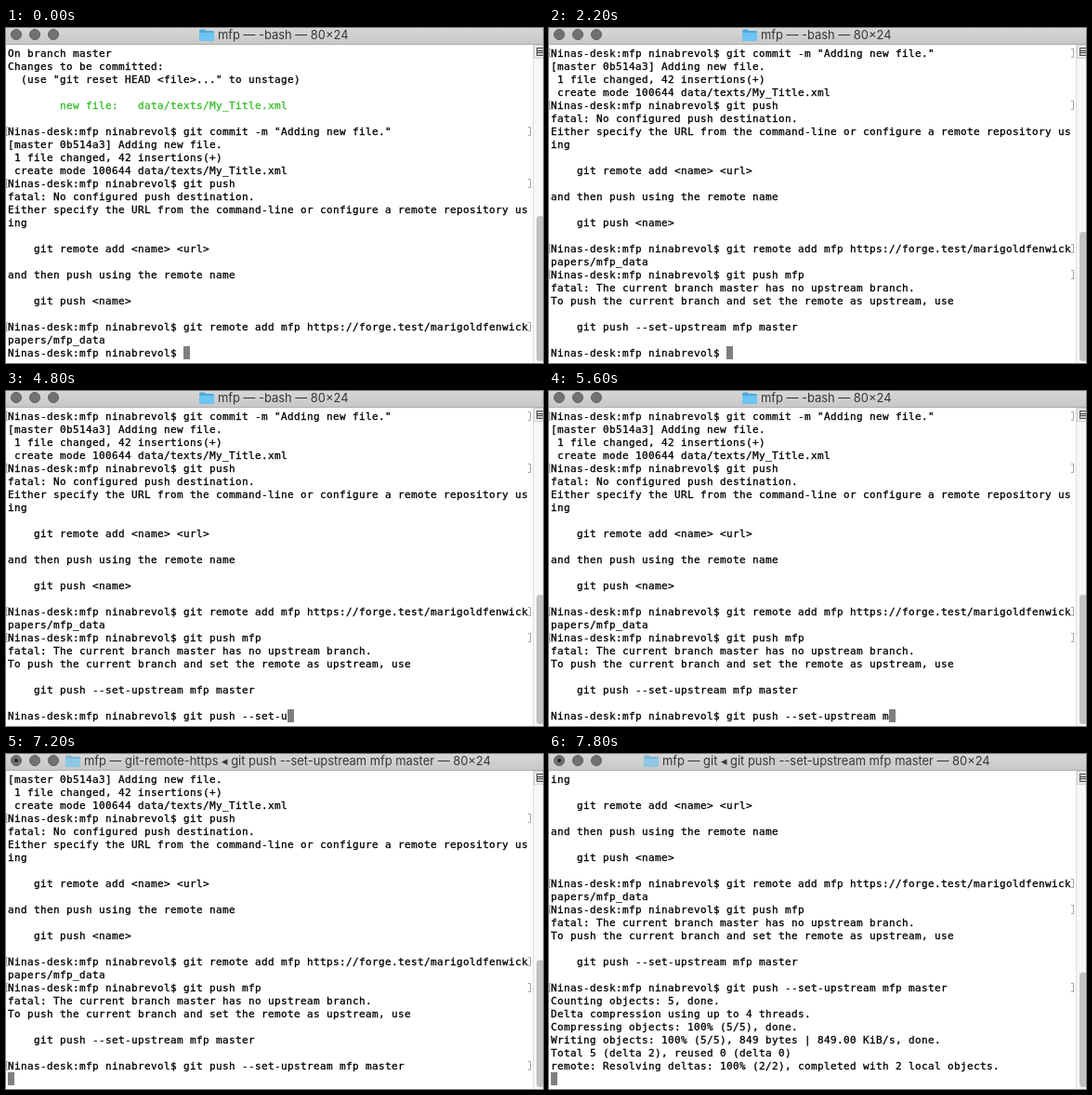
An HTML page that plays this animation: 578x360 px, repeating every 8 s.

```html
<!DOCTYPE html>
<html lang="en">
<head>
<meta charset="utf-8">
<title>Terminal</title>
<style>
  html, body { margin: 0; width: 100%; height: 100%; overflow: hidden; background: #fff; }
  svg { display: block; width: 578px; height: 360px; }
  text { white-space: pre; }
  #rows text {
    font: 11px "DejaVu Sans Mono", "Noto Sans Mono", monospace;
    letter-spacing: .377px;
    fill: #000;
    stroke: #000;
    stroke-width: .3px;
  }
  #rows text.added { fill: #34bc26; stroke: #34bc26; }
  #rows path { fill: none; stroke: #a3a3a3; }
  #title { font: 12.9px Inter, "DejaVu Sans", sans-serif; fill: #363636; }
</style>
</head>
<body>
<svg viewBox="0 0 578 360">
  <defs>
    <linearGradient id="bar" x2="0" y2="1">
      <stop offset="0" stop-color="#d6d6d6"/>
      <stop offset="1" stop-color="#c8c8c8"/>
    </linearGradient>
  </defs>
  <rect width="578" height="360" fill="#fff"/>

  <g id="rows"></g>
  <rect id="cursor" width="7" height="14" fill="#7f7f7f"/>

  <rect x="567" y="18" width="11" height="342" fill="#f7f7f7"/>
  <path d="M567.5 18V360" stroke="#dedede"/>
  <rect id="thumb" x="571" width="8" rx="3.5" fill="#c1c1c1"/>
  <rect x="568.5" y="18.5" width="12" height="14" fill="#ececec" stroke="#cfcfcf"/>
  <rect x="571.5" y="21.5" width="8" height="8" fill="#d0d0d0" stroke="#4a4a4a"/>
  <path d="M572 24.5H578M572 26.5H578" stroke="#4a4a4a"/>

  <rect width="578" height="17" fill="url(#bar)"/>
  <path d="M0 17.5H578" stroke="#adadad"/>
  <g fill="#717171" stroke="#5f5f5f">
    <circle cx="11" cy="7" r="5.5"/>
    <circle cx="31" cy="7" r="5.5"/>
    <circle cx="51" cy="7" r="5.5"/>
  </g>
  <circle id="busy" cx="11" cy="7" r="2" fill="#222"/>
  <g id="folder">
    <path d="M0 3Q0 1.5 1.5 1.5H5.5L7.5 3H14.5Q16 3 16 4.5V12.5Q16 14 14.5 14H1.5Q0 14 0 12.5Z" fill="#4fa9dc"/>
    <path d="M0 5H16V12.5Q16 14 14.5 14H1.5Q0 14 0 12.5Z" fill="#6cc5f3"/>
  </g>
  <text id="title" y="12"></text>
</svg>

<script>
const LOOP = 8000, ROWS = 24, LINE = 14, CHAR = 7, LEFT = 2, TOP = 20;
const PROMPT = "Ninas-desk:mfp ninabrevol$ ";
const PUSH = "git push mfp";
const UPSTREAM = "git push --set-upstream mfp master";

const buffer = [
  "On branch master",
  "Changes to be committed:",
  '  (use "git reset HEAD <file>..." to unstage)',
  "",
  "        new file:   data/texts/My_Title.xml",
  "",
  PROMPT + 'git commit -m "Adding new file."',
  "[master 0b514a3] Adding new file.",
  " 1 file changed, 42 insertions(+)",
  " create mode 100644 data/texts/My_Title.xml",
  PROMPT + "git push",
  "fatal: No configured push destination.",
  "Either specify the URL from the command-line or configure a remote repository us",
  "ing",
  "",
  "    git remote add <name> <url>",
  "",
  "and then push using the remote name",
  "",
  "    git push <name>",
  "",
  PROMPT + "git remote add mfp https://forge.test/marigoldfenwick",
  "papers/mfp_data",
  PROMPT + PUSH,
  "fatal: The current branch master has no upstream branch.",
  "To push the current branch and set the remote as upstream, use",
  "",
  "    " + UPSTREAM,
  "",
  PROMPT + UPSTREAM,
  "Counting objects: 5, done.",
  "Delta compression using up to 4 threads.",
  "Compressing objects: 100% (5/5), done.",
  "Writing objects: 100% (5/5), 849 bytes | 849.00 KiB/s, done.",
  "Total 5 (delta 2), reused 0 (delta 0)",
  "remote: Resolving deltas: 100% (2/2), completed with 2 local objects."
];

const titles = {
  idle: { x: 208, text: "mfp — -bash — 80×24" },
  remote: { x: 64, text: `mfp — git-remote-https ◂ ${UPSTREAM} — 80×24`, busy: true },
  git: { x: 102, text: `mfp — git ◂ ${UPSTREAM} — 80×24`, busy: true }
};

// Each state: start time, rows in the buffer, last row, title
const states = [];
const add = (at, rows, last = "", title = "idle") => states.push({ at, rows, last, title });
const type = (at, rows, command, counts) => counts.forEach((n, i) =>
  add(at + i * 200, rows, PROMPT + command.slice(0, n)));

add(0, 24, PROMPT);
type(800, 24, PUSH, [2, 4, 6, 8, 10, 12]);
add(2000, 25);
add(2200, 30, PROMPT);
type(3000, 30, UPSTREAM, [
  2, 3, 5, 7, 8, 10,
  12, 13, 15, 16, 18, 21,
  23, 25, 26, 28, 30, 32, 34
]);
add(6800, 31);
add(7000, 31, "", "remote");
add(7400, 36, "", "git");
add(7600, 37, "", "git");

const $ = id => document.getElementById(id);
const set = (el, attrs) => {
  for (const key in attrs) el.setAttribute(key, attrs[key]);
  return el;
};
const make = (tag, attrs) =>
  $("rows").appendChild(set(document.createElementNS("http://www.w3.org/2000/svg", tag), attrs));

function drawRow(text, i, sent) {
  const y = TOP + i * LINE;
  const el = make("text", { x: LEFT, y: y + 11 });
  el.textContent = text;
  if (text.includes("new file:")) el.classList.add("added");
  if (sent) make("path", { d: `M2 ${y + 2.5}H.5V${y + 11.5}H2M562 ${y + 2.5}H564.5V${y + 11.5}H562` });
}

function draw({ rows, last, title }) {
  $("rows").replaceChildren();
  const first = rows - ROWS;
  buffer.slice(first, rows - 1).forEach((text, i) => drawRow(text, i, text.startsWith(PROMPT)));
  drawRow(last, ROWS - 1, false);
  set($("cursor"), { x: LEFT + last.length * CHAR, y: TOP + (ROWS - 1) * LINE });

  // The thumb shrinks as the scrollback grows
  const height = 318.5 * ROWS / (rows + 25);
  set($("thumb"), { y: 358 - height, height });

  const { x, text, busy } = titles[title];
  $("title").textContent = text;
  set($("title"), { x: x + 20 });
  set($("folder"), { transform: `translate(${x} 0)`, opacity: busy ? .65 : 1 });
  set($("busy"), { visibility: busy ? "visible" : "hidden" });
}

let shown;
function tick() {
  const t = performance.now() % LOOP;
  const state = states.findLast(s => s.at <= t);
  if (state !== shown) draw(shown = state);
  requestAnimationFrame(tick);
}
tick();
</script>
</body>
</html>
```
